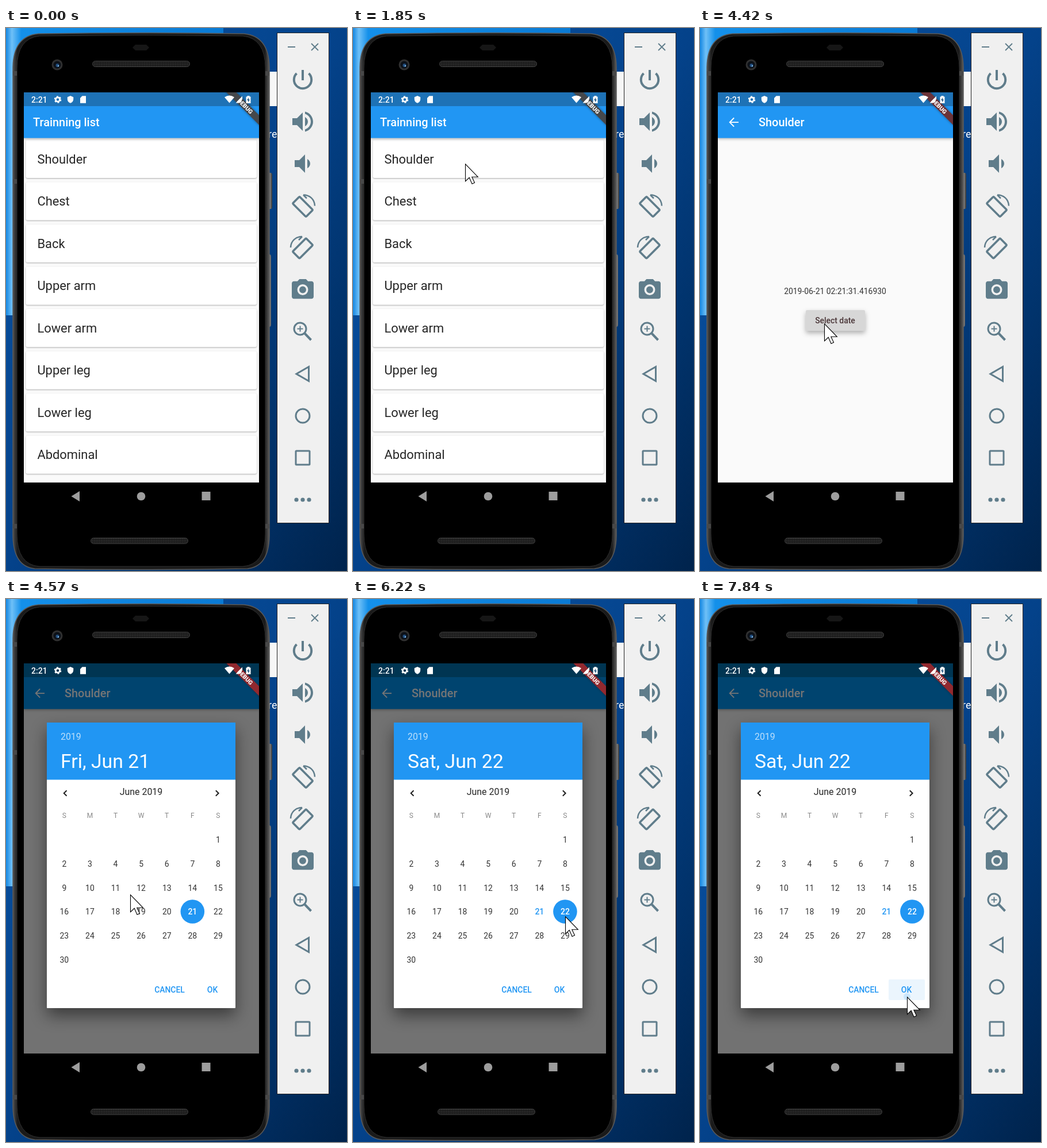
Write an HTML page that moves like this. It is 593 px wide and 945 px high and loops after 8000 ms.

```html
<!DOCTYPE html>
<html lang="en">
<head>
<meta charset="utf-8">
<title>Training list date picker</title>
<style>
  html, body { margin: 0; width: 100%; height: 100%; overflow: hidden; background: #003a78; }
  svg { display: block; width: 100vw; height: 100vh; }
  text { font-family: Roboto, "Noto Sans", sans-serif; fill: #262626; }
  .mid { text-anchor: middle; }
  .bold { font-weight: 500; }
  .small { font-size: 13.9px; fill: #333; }
  .white { fill: #fff; }
  .blue { fill: #2196f3; }
  .title { font-size: 19.9px; font-weight: 500; fill: #fff; }
  .item { font-size: 21.9px; }
  .line { fill: none; stroke: #607d8b; stroke-width: 3; }
  .thick { stroke-width: 4; }
  .card { filter: drop-shadow(0 1px 1px rgba(0,0,0,.32)); }
  .bar { filter: drop-shadow(0 2px 2px rgba(0,0,0,.25)); }
  #status { fill: #1e72b6; }
  .picking .bar { fill: #0094f3; }
  .picking #status { fill: #0073b4; }
  #button { fill: #e0e0e0; filter: drop-shadow(0 1.5px 1.5px rgba(0,0,0,.35)); }
  #button.pressed { fill: #d7d7d7; filter: drop-shadow(0 4px 4px rgba(0,0,0,.3)); }
  .pressed + * + text { fill: #4a3638; }
  .dialog { filter: drop-shadow(0 13px 14px rgba(0,0,0,.48)); }
  #band { filter: drop-shadow(0 0 2px rgba(0,0,0,.4)); }
</style>
</head>
<body>
<svg id="stage" viewBox="0 0 593 945" preserveAspectRatio="none">
  <defs>
    <linearGradient id="desk" x2="1" y2="1">
      <stop offset="0" stop-color="#0a55a8"/><stop offset=".5" stop-color="#04428a"/>
      <stop offset=".75" stop-color="#01336c"/><stop offset="1" stop-color="#00234c"/>
    </linearGradient>
    <linearGradient id="glow">
      <stop offset="0" stop-color="#1487e2"/><stop offset=".027" stop-color="#6fc0f7"/>
      <stop offset=".07" stop-color="#1490ea"/><stop offset="1" stop-color="#0a7ad4"/>
    </linearGradient>
    <linearGradient id="body">
      <stop offset="0" stop-color="#505050"/><stop offset=".018" stop-color="#1a1a1a"/>
      <stop offset=".982" stop-color="#1a1a1a"/><stop offset="1" stop-color="#5c5c5c"/>
    </linearGradient>
    <linearGradient id="key"><stop offset="0" stop-color="#222"/><stop offset=".6" stop-color="#8a8a8a"/><stop offset="1" stop-color="#333"/></linearGradient>
    <pattern id="mesh" width="3" height="3" patternUnits="userSpaceOnUse">
      <rect width="3" height="3" fill="#191919"/><rect width="1.5" height="1.5" fill="#3b3b3b"/>
    </pattern>
    <clipPath id="screen"><path d="M31 112H440V791H31z"/></clipPath>
    <clipPath id="buttonArea"><path d="M184 491H287V527H184z"/></clipPath>
    <g id="turn">
      <rect x="-8.500" y="-16.500" width="17" height="33" rx="2" transform="rotate(-45)" class="line" style="stroke-width:3.600"/>
      <path d="M1-20.500C12-20.500 20.500-13 21-1.500M1-20.500L7-14.500" class="line" style="stroke-width:2.500"/>
    </g>
  </defs>

  <rect width="593" height="945" fill="url(#desk)"/>
  <rect width="378" height="500" fill="url(#glow)"/>
  <rect x="440" y="76" width="32" height="60" fill="#f6f6f6"/>
  <text x="456" y="191" font-size="18" class="white">re</text>

  <g id="phone">
    <path d="M452 252h8q3 0 3 4v55q0 4-3 4h-8zM452 394h6q3 0 3 4v118q0 4-3 4h-6zM452 650h6v46h-6z" fill="url(#key)"/>
    <path d="M12 68Q13 14 56 10Q235 7 414 10Q457 14 458 68V884Q457 937 420 941Q235 944 50 941Q13 937 12 884z" fill="url(#body)" stroke="#5a5a5a" stroke-width="1.500"/>
    <path d="M19 70Q19 18 58 14Q235 11 412 14Q451 18 451 70V880Q451 934 412 937H58Q19 934 19 880z" fill="#000" stroke="#303030"/>
    <path d="M12 75h7v8h-7zM12 263h7v8h-7zM12 863h7v8h-7zM451 75h7v8h-7zM451 863h7v8h-7z" fill="#484848"/>
    <path d="M225 29h19l5 5-5 5h-19l-5-5z" fill="#161616"/>
    <circle cx="89" cy="64" r="9.500" fill="#303030"/>
    <circle cx="89" cy="64" r="6.500" fill="#0c1118"/>
    <circle cx="89.500" cy="65" r="3" fill="#234f80"/>
    <circle cx="91" cy="66" r="1.200" fill="#8dc4ee"/>
    <g fill="url(#mesh)" stroke="#3d3d3d">
      <rect x="150.500" y="57.500" width="169" height="10" rx="5"/>
      <rect x="147.500" y="887.500" width="169" height="10" rx="5"/>
    </g>
    <g fill="#9d9d9d">
      <path d="M113.500 815L128 806V824z"/><circle cx="235" cy="815" r="7.300"/><path d="M340.500 807H355.500V822H340.500z"/>
    </g>
  </g>

  <g clip-path="url(#screen)">
    <rect x="31" y="112" width="409" height="679" fill="#fafafa"/>
    <g id="list"></g>
    <rect x="31" y="136" width="409" height="55.500" class="blue bar"/>
    <rect id="status" x="31" y="112" width="409" height="24"/>
    <text id="listTitle" x="47" y="171" class="title">Trainning list</text>
    <g id="page">
      <g id="pageText">
        <path d="M67 163.200H53.900L59.900 157.100 58.400 155.700 50.400 164.100 58.400 172.300 59.900 170.900 53.900 165.100H67z" class="white"/>
        <text x="102" y="171" class="title">Shoulder</text>
        <text x="235" y="462.500" class="mid small">2019-06-21 02:21:31.416930</text>
      </g>
      <rect id="button" x="184" y="491" width="103" height="36" rx="2"/>
      <circle id="splash" cx="216" cy="514" r="15.500" fill="#000" opacity=".1" clip-path="url(#buttonArea)"/>
      <text id="buttonText" x="235" y="514" class="mid small bold">Select date</text>
    </g>

    <g id="picker">
      <rect x="31" y="112" width="409" height="679" opacity=".54"/>
      <rect x="71" y="215" width="328" height="497" rx="1" class="white dialog"/>
      <rect x="71" y="215" width="328" height="99.500" class="blue"/>
      <text x="95" y="245" font-size="15.900" class="white" opacity=".7">2019</text>
      <text id="heading" x="95" y="294" font-size="33.800" class="white"></text>
      <text x="235" y="341" font-size="15.900" class="mid">June 2019</text>
      <path d="M105.500 333.300L100.700 338L105.500 342.800M364.800 333.300L369.600 338L364.800 342.800" fill="none" stroke="#212121" stroke-width="2"/>
      <circle id="chosen" cy="544" r="20.800" class="blue"/>
      <g id="days"></g>
      <g id="okPress">
        <rect x="328" y="662" width="63" height="36" rx="2" fill="#ebf5fd"/>
        <circle cx="360" cy="692" r="6" class="blue" opacity=".16"/>
      </g>
      <text x="284.500" y="685" class="mid small bold blue">CANCEL</text>
      <text x="359" y="685" class="mid small bold blue">OK</text>
    </g>

    <g transform="translate(440 112) rotate(45)">
      <rect id="band" x="-42" y="28" width="84" height="12"/>
      <text y="37.700" font-size="10.200" font-weight="900" class="mid white">DEBUG</text>
    </g>
    <g class="white">
      <text x="44" y="129.800" font-size="14" class="bold white">2:21</text>
      <g fill="none" stroke="#fff">
        <circle cx="90" cy="124.500" r="3.600" stroke-width="2.600"/>
        <circle cx="90" cy="124.500" r="5.300" stroke-width="2" stroke-dasharray="2.900 2.650"/>
      </g>
      <path d="M112 118l5.200 2.200v3.800c0 3.200-2.200 5.700-5.200 6.700-3-1-5.200-3.500-5.200-6.700v-3.800z"/>
      <path d="M132.500 118.300h6.500v12.400h-10v-8.700z"/>
      <path d="M380 120.500Q388.500 114.500 397 120.500L388.500 130.500z"/>
      <path d="M399.500 130.500L411 118.500v5.500L405 130.500z"/>
      <path d="M417.500 119.500h2v-1.500h4v1.500h2v11.500h-8z"/>
      <path d="M422 121l-3 4.700h2v3.500l3-4.700h-2z" fill="#1e5580"/>
    </g>
  </g>

  <g id="toolbar" fill="#607d8b">
    <rect x="471.500" y="8.500" width="90" height="853" fill="#f0f0f0" stroke="#222"/>
    <path d="M490 33H503M531 27L543 39M543 27L531 39" class="line" style="stroke-width:1.800"/>
    <path d="M505.500 79A15.200 15.200 0 1 0 526.500 79M516 73V91" class="line thick"/>
    <path transform="translate(492 139) scale(2)" d="M3 9v6h4l5 5V4L7 9zM16.500 12c0-1.770-1.020-3.290-2.500-4.030v8.050c1.480-.73 2.500-2.250 2.500-4.020zM14 3.230v2.060c2.890.86 5 3.540 5 6.710s-2.110 5.850-5 6.710v2.060c4.010-.91 7-4.490 7-8.770s-2.990-7.860-7-8.770z"/>
    <path transform="translate(492 212) scale(2)" d="M18.500 12c0-1.770-1.020-3.290-2.500-4.030v8.050c1.480-.73 2.500-2.250 2.500-4.020zM5 9v6h4l5 5V4L9 9z"/>
    <use href="#turn" x="516" y="311"/>
    <use href="#turn" transform="translate(516 383.500) scale(-1 1)"/>
    <path transform="translate(493.200 433.200) scale(1.900)" d="M9 2L7.170 4H4c-1.100 0-2 .9-2 2v12c0 1.100.9 2 2 2h16c1.100 0 2-.9 2-2V6c0-1.100-.9-2-2-2h-3.170L15 2z"/>
    <circle cx="516" cy="455.500" r="7.700" fill="none" stroke="#f0f0f0" stroke-width="3.500"/>
    <circle cx="511.500" cy="523.500" r="10.500" class="line"/>
    <path d="M519 531L530.500 543" class="line thick"/>
    <path d="M506.500 523.500H516.500M511.500 518.500V528.500" class="line" style="stroke-width:2"/>
    <path d="M505 602L526.500 589.500V614.500z" class="line"/>
    <circle cx="516" cy="675" r="12" class="line"/>
    <rect x="504" y="736" width="24" height="24" rx="1" class="line"/>
    <circle cx="505" cy="821" r="3.600"/><circle cx="516" cy="821" r="3.600"/><circle cx="527" cy="821" r="3.600"/>
  </g>

  <g id="cursor">
    <circle id="click" cx=".5" cy=".5" r="22" fill="#ff0" opacity=".47"/>
    <path d="M.5 .8V30.700L7.200 24.300 12 35.300 16.500 33.300 11.800 23.300H22.300z" fill="#fff" stroke="#000" stroke-width="1.100"/>
  </g>
</svg>

<script>
const LOOP = 8000;
const $ = id => document.getElementById(id);
const show = (id, on) => { $(id).style.display = on ? '' : 'none'; };

function add(parent, tag, attrs, text = '') {
  const el = document.createElementNS('http://www.w3.org/2000/svg', tag);
  for (const key in attrs) el.setAttribute(key, attrs[key]);
  el.textContent = text;
  return parent.appendChild(el);
}

['Shoulder', 'Chest', 'Back', 'Upper arm', 'Lower arm', 'Upper leg', 'Lower leg', 'Abdominal'].forEach((name, i) => {
  const y = 194.7 + i * 73.55;
  add($('list'), 'rect', { x: 34.5, y, width: 401.5, height: 66.3, rx: 3, class: 'white card' });
  add($('list'), 'text', { x: 54.4, y: y + 40.8, class: 'item' }, name);
});

const column = i => 101.3 + i * 44.6;
[...'SMTWTFS'].forEach((day, i) =>
  add($('days'), 'text', { x: column(i), y: 381.4, class: 'mid', 'font-size': 12, opacity: .55 }, day));
const days = {};
for (let d = 1; d <= 30; d++) {
  const cell = d + 5;
  days[d] = add($('days'), 'text',
    { x: column(cell % 7), y: 424 + Math.floor(cell / 7) * 41.75, class: 'mid small' }, d);
}

// Each move is shown in hard steps along a quadratic curve.
const linear = p => p, smooth = p => p * p * (3 - 2 * p), easeOut = p => p * (2 - p);
const moves = [
  { at: 470, span: 150, steps: 3, via: [310, 720.5], to: [346, 314], ease: linear },
  { at: 930, span: 380, steps: 6, via: [265, 262], to: [195, 236], ease: smooth },
  { at: 3050, span: 280, steps: 5, via: [212, 390], to: [227, 468], ease: easeOut },
  { at: 3430, span: 220, steps: 4, via: [240, 500], to: [216, 514], ease: linear },
  { at: 5050, span: 530, steps: 8, via: [300, 572], to: [369, 552], ease: smooth },
  { at: 6600, span: 650, steps: 9, via: [387, 620], to: [360, 692], ease: smooth }
];
const clicks = [[1770, 1850], [3890, 3960], [5900, 5970], [7690, 7770]];

function cursorAt(t) {
  let pos = [274, 1127];
  for (const { at, span, steps, via, to, ease } of moves) {
    if (t < at) break;
    const step = Math.floor((t - at) / (span / (steps - 1)) + 1e-6) + 1;
    const p = ease(Math.min(1, step / steps)), q = 1 - p;
    pos = pos.map((from, i) => Math.round(q * q * from + 2 * p * q * via[i] + p * p * to[i]));
  }
  return pos;
}

function draw(t) {
  const onPage = t >= 2550, picking = t >= 4570, changed = t >= 6220;
  show('list', !onPage);
  show('listTitle', !onPage);
  show('page', onPage);
  $('pageText').style.opacity = $('buttonText').style.opacity = t < 2720 ? .88 : 1;
  show('splash', t >= 4110 && t < 4420);
  $('button').classList.toggle('pressed', t >= 4420);
  $('band').style.fill = t < 4110 ? '#46484b' : t < 4420 ? '#5c3a40' : picking ? '#92292f' : '#6b3339';

  $('stage').classList.toggle('picking', picking);
  show('picker', picking);
  $('heading').textContent = changed ? 'Sat, Jun 22' : 'Fri, Jun 21';
  $('chosen').setAttribute('cx', column(changed ? 6 : 5));
  days[21].setAttribute('class', 'mid small bold ' + (changed ? 'blue' : 'white'));
  days[22].setAttribute('class', 'mid small ' + (changed ? 'bold white' : ''));
  show('okPress', t >= 7840);

  show('cursor', t >= 470);
  show('click', clicks.some(([from, to]) => t >= from && t < to));
  $('cursor').setAttribute('transform', `translate(${cursorAt(t)})`);
}

const start = performance.now();
function tick() {
  draw((performance.now() - start) % LOOP);
  requestAnimationFrame(tick);
}
tick();
</script>
</body>
</html>
```
